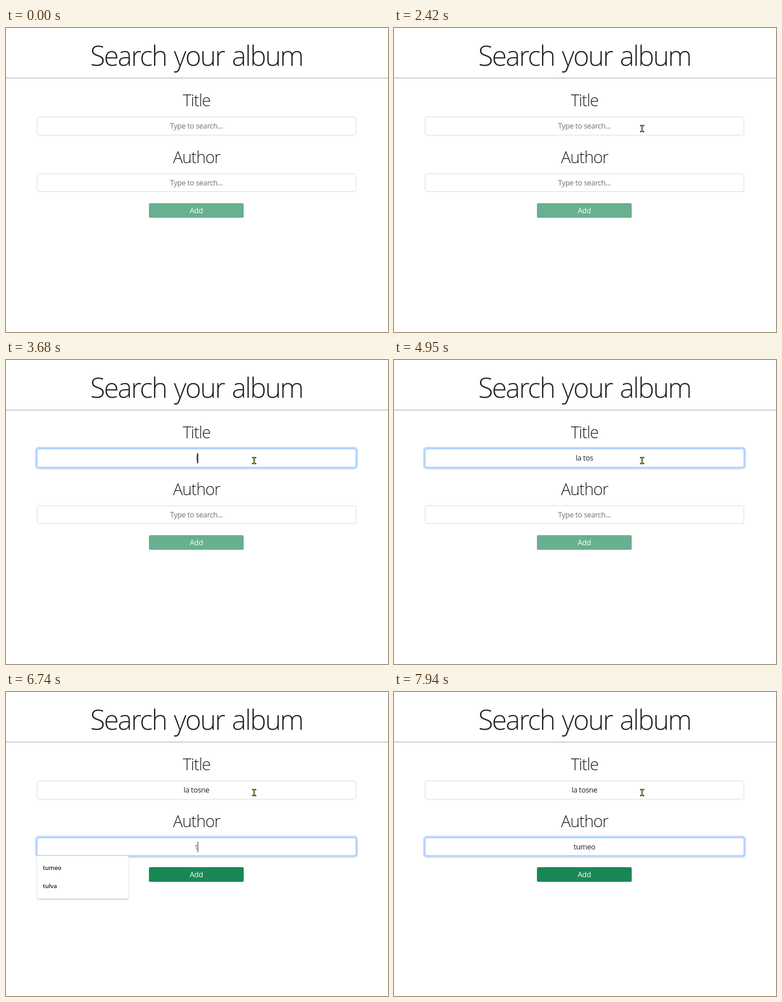
An HTML page for the animation above (8000 ms loop, 839 px wide and 668 px high).

```html
<!DOCTYPE html>
<html lang="en">
<head>
<meta charset="utf-8">
<title>Search your album</title>
<style>
  html, body { margin: 0; width: 100%; height: 100%; overflow: hidden; background: #fff; }
  #stage { position: relative; width: 839px; height: 668px; overflow: hidden;
    font: 16.3px "Open Sans", "Noto Sans", sans-serif; letter-spacing: -.025em; color: #212529; }
  #stage > *, .caret, .field::after { position: absolute; box-sizing: border-box; }
  h1, h2 { left: 0; width: 837px; margin: 0; text-align: center; font-weight: 300; white-space: nowrap; }
  h1 { top: 19.5px; font-size: 60px; line-height: 80px; letter-spacing: -.045em; word-spacing: .06em; }
  h2 { font-size: 36px; line-height: 44px; letter-spacing: -.035em; }
  .rule { top: 109.3px; width: 100%; height: 1.5px; background: #c3c4c5; }
  .field { left: 67.5px; width: 701.5px; height: 40.5px; border: 1px solid #ced4da; border-radius: 4.2px;
    text-align: center; line-height: 39.5px; }
  .field::after { content: ""; inset: -1px; border: 1px solid #86b7fe; border-radius: 4.2px;
    box-shadow: 0 0 0 4.2px #c2dbfe; opacity: var(--focus, 0); }
  .text { position: relative; white-space: pre; }
  .caret { top: 8.5px; width: 1.5px; height: 22.5px; background: #000; }
  .button { left: 314px; top: 385px; width: 208px; height: 32px; border-radius: 3.5px;
    background: #198754; box-shadow: 0 0 1px #198754; color: #fff; text-align: center; line-height: 32px; }
  .menu { left: 68px; top: 360px; width: 201px; padding: 7px 13px 8px; border-radius: 0 0 4px 4px;
    background: #fff; box-shadow: 0 0 1px #0005, 0 2px 3px #0003;
    font-size: 13px; font-weight: 600; line-height: 39.5px; letter-spacing: -.01em; }
  #pointer { left: 0; top: 0; overflow: visible; }
</style>
</head>
<body>
<div id="stage">
  <h1>Search your album</h1>
  <div class="rule"></div>
  <h2 style="top:137px">Title</h2>
  <div class="field" id="title" style="top:195.2px"><span class="text"></span><i class="caret"></i></div>
  <h2 style="top:262px">Author</h2>
  <div class="field" id="author" style="top:319.7px"><span class="text"></span><i class="caret"></i></div>
  <div class="button" id="add">Add</div>
  <div class="menu" id="menu"><div>tumeo</div><div id="second">tulva</div></div>
  <svg id="pointer" width="1" height="1">
    <path id="arrow" d="M0 0v17l4-4 3 6 3-1-3-6h5z" transform="scale(1.2)" fill="#a6d34a" stroke="#000"/>
    <g id="beam" fill="none">
      <path d="M-4.5-6.5h9M-4.5 6.5h9M0-6.5v13" stroke="#111" stroke-width="3"/>
      <path d="M-3.5-6.5h7M-3.5 6.5h7M0-6.5v13" stroke="#9cc04a" stroke-width="1.4"/>
    </g>
  </svg>
</div>
<script>
const LOOP = 8000, BLINK = 530, TAB = 5750;
const byId = id => document.getElementById(id);
const clamp = x => Math.max(0, Math.min(1, x));
const ramp = (t, start, length) => clamp((t - start) / length);
const latest = (list, t) => list.findLast(entry => entry[0] <= t);

// [time, value]; the first entry of each is the moment of focus
const titleKeys = [[2750, ""], [3680, "l"], [3940, "la"], [4140, "la "], [4270, "la to"],
  [4400, "la tos"], [5420, "la tosn"], [5560, "la tosne"]];
const authorKeys = [[5810, ""], [6740, "t"], [7080, "tu"], [7145, "tum"], [7210, "tume"], [7400, "tumeo"]];

// [time, x, y]
const sweep = [[765, 606], [720, 530], [660, 425], [615, 300], [580, 190], [562, 143], [552, 165], [547, 200], [545, 221]];
const pointerPath = [[0, 0, -99], [560, 764, 660], [625, 775, 652], [690, 789, 645],
  ...sweep.map(([x, y], i) => [1880 + 67.5 * i, x, y])];

function drawField(id, keys, t, focus, active) {
  const field = byId(id), text = field.querySelector(".text"), caret = field.querySelector(".caret");
  const [since, value] = latest(keys, t) || [0, ""];
  const caretOn = active && t >= keys[0][0] && (t - since) % (2 * BLINK) < BLINK;
  text.textContent = value || "Type to search...";
  text.style.color = value ? "" : "#6c757d";
  text.style.opacity = value.length === 1 && t < since + 60 ? .6 : 1;
  field.style.setProperty("--focus", focus);
  caret.style.display = caretOn ? "" : "none";
  caret.style.left = (value ? text.offsetLeft + text.getBoundingClientRect().width : 350) + "px";
}

function drawPointer(t) {
  const [, x, y] = latest(pointerPath, t);
  const overField = (y > 195 && y < 236) || (y > 320 && y < 360);
  byId("pointer").style.transform = `translate(${x}px, ${y}px)`;
  byId("arrow").style.display = overField ? "none" : "";
  byId("beam").style.display = overField ? "" : "none";
}

function render(t) {
  drawField("title", titleKeys, t, ramp(t, 2750, 150) - ramp(t, TAB, 150), t < TAB);
  drawField("author", authorKeys, t, ramp(t, TAB, 130), t >= TAB);
  byId("add").style.opacity = t < 6740 ? .65 : 1;
  byId("menu").style.opacity = t < 6740 ? 0 : 1 - ramp(t, 7420, 200);
  byId("second").style.display = t < 7145 ? "" : "none";
  drawPointer(t);
}

const start = performance.now();
function tick() {
  render((performance.now() - start) % LOOP);
  requestAnimationFrame(tick);
}
tick();
</script>
</body>
</html>
```
